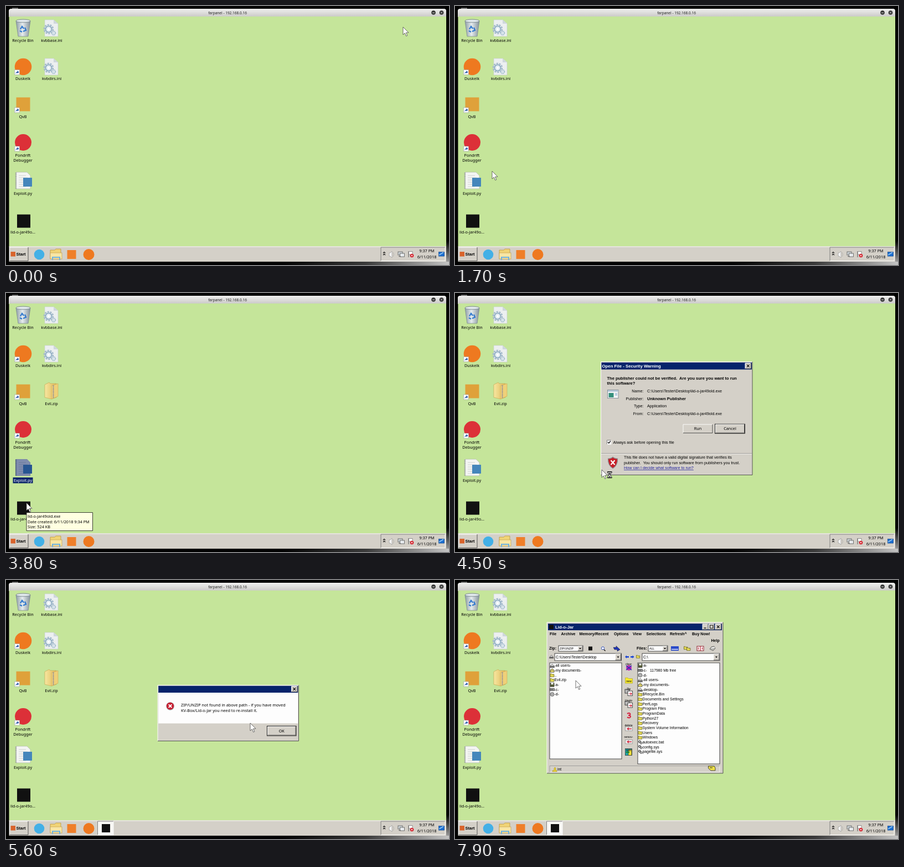
An HTML page that plays this animation: 800 px wide and 469 px high, repeating every 8000 ms.

```html
<!DOCTYPE html>
<html lang="en">
<head>
<meta charset="utf-8">
<title>Remote desktop session</title>
<style>
html, body { margin: 0; width: 100%; height: 100%; overflow: hidden; background: #000; }
svg { display: block; width: 100vw; height: 100vh; }
text { font: 500 7.3px "Noto Sans", sans-serif; white-space: pre; }
.mid { text-anchor: middle; }
.end { text-anchor: end; }
.arial { font: 7.2px "Liberation Sans", sans-serif; }
.list { font: 6.8px "Liberation Sans", sans-serif; }
.tiny { font: 5.2px "Liberation Sans", sans-serif; }
.bold { font: bold 7.5px "Liberation Sans", sans-serif; }
.menu { font: bold 7.1px "Liberation Sans", sans-serif; }
.title { font: bold 7.8px "Liberation Sans", sans-serif; fill: #fff; }
.frame { font-size: 6.5px; }

.timed { animation: 8s step-end infinite; }
#archive { animation-name: archive; }
#scriptSel { animation-name: scriptSel; }
#appSel { animation-name: appSel; }
#tip { animation-name: tip; }
#warning { animation-name: warning; }
#error { animation-name: error; }
#task { animation-name: task; }
#app { animation-name: app; }
#busy { animation-name: busy; }
@keyframes archive { 0% { opacity: 0 } 32.5%, 100% { opacity: 1 } }
@keyframes scriptSel { 0%, 50% { opacity: 0 } 26.25% { opacity: 1 } 100% { opacity: 0 } }
@keyframes appSel { 0%, 55%, 68.75% { opacity: 0 } 50%, 66.25% { opacity: 1 } 100% { opacity: 0 } }
@keyframes tip { 0%, 50% { opacity: 0 } 47.5% { opacity: 1 } 100% { opacity: 0 } }
@keyframes warning { 0%, 66.25% { opacity: 0 } 55% { opacity: 1 } 100% { opacity: 0 } }
@keyframes error { 0%, 76.25% { opacity: 0 } 68.75% { opacity: 1 } 100% { opacity: 0 } }
@keyframes task { 0% { opacity: 0 } 68.75%, 100% { opacity: 1 } }
@keyframes app { 0% { opacity: 0 } 77.5%, 100% { opacity: 1 } }
@keyframes busy { 0%, 58.75% { opacity: 0 } 52.5% { opacity: 1 } 100% { opacity: 0 } }

/* The pointer moves in 100 ms ticks. */
#pointer { animation: point 8s infinite; }
@keyframes point {
  0% { transform: translate(717px, 38px); animation-timing-function: steps(4); }
  5% { transform: translate(402px, 164px); animation-timing-function: steps(1); }
  7.5% { transform: translate(311px, 201px); animation-timing-function: steps(1); }
  10% { transform: translate(311px, 201px); animation-timing-function: steps(9); }
  21.25% { transform: translate(67px, 299px); animation-timing-function: steps(3); }
  25%, 35% { transform: translate(34px, 317px); animation-timing-function: steps(6); }
  42.5%, 51.25% { transform: translate(37px, 380px); animation-timing-function: steps(4); }
  56.25%, 60% { transform: translate(265px, 320px); animation-timing-function: steps(3); }
  63.75%, 67.5% { transform: translate(424px, 245px); animation-timing-function: steps(2); }
  70% { transform: translate(441px, 259px); animation-timing-function: steps(3); }
  73.75%, 81.25% { transform: translate(490px, 275px); animation-timing-function: steps(10); }
  93.75%, 100% { transform: translate(218px, 182px); }
}
</style>
</head>
<body>
<svg viewBox="0 0 800 469" preserveAspectRatio="none">
  <defs>
    <linearGradient id="chrome" x2="0" y2="1">
      <stop stop-color="#f0f0ef"/><stop offset="1" stop-color="#c9c8c6"/>
    </linearGradient>
    <linearGradient id="glow">
      <stop stop-color="#000"/><stop offset=".5" stop-color="#3a3a3a"/><stop offset="1" stop-color="#c4c4c4"/>
    </linearGradient>
    <linearGradient id="glowUp" x2="0" y2="1">
      <stop stop-color="#000"/><stop offset="1" stop-color="#999"/>
    </linearGradient>
    <linearGradient id="manila" x2="1">
      <stop stop-color="#f7e6a0"/><stop offset="1" stop-color="#dfb95a"/>
    </linearGradient>
    <linearGradient id="glass" x2="1">
      <stop stop-color="#8d9ca5"/><stop offset=".45" stop-color="#e6ecee"/><stop offset="1" stop-color="#84929b"/>
    </linearGradient>
    <g id="ini">
      <path d="M1 0H17L25 7V30H1Z" fill="#eceff0" stroke="#c3cbd0" stroke-width=".6"/>
      <path d="M17 0V7H25Z" fill="#cfd7dc"/>
      <circle cx="8" cy="17" r="8" fill="none" stroke="#a3bacb" stroke-width="2.6" stroke-dasharray="3.2 1.8"/>
      <circle cx="8" cy="17" r="5.6" fill="#e3ecf2" stroke="#8aa9c0" stroke-width="1.8"/>
      <circle cx="8" cy="17" r="2" fill="#fff"/>
      <circle cx="17" cy="24" r="3.5" fill="#d8e3ea" stroke="#9db8ca" stroke-width="1.5" stroke-dasharray="1.8 1"/>
    </g>
    <g id="link">
      <path d="M0 0H9V9H0Z" fill="#fff" stroke="#889" stroke-width=".5"/>
      <path d="M2 8C1.7 5 3 3.6 5 3.4V1.6L8 4.2 5 6.8V5.2C3.4 5.2 2.4 6 2 8Z" fill="#2253a8"/>
    </g>
    <g id="folder">
      <path d="M.5 1.5H3L4 2.5H7.3V7H.5Z" fill="#eee35c" stroke="#5f5a1a" stroke-width=".8"/>
      <path d="M1 4H7" stroke="#b5a932" stroke-width=".6"/>
    </g>
    <g id="drive">
      <path d="M0 2H8V6H0Z" fill="#aaa" stroke="#222" stroke-width=".7"/><path d="M1 4H6" stroke="#222" stroke-width=".8"/>
    </g>
    <g id="floppy">
      <path d="M.5 .5H7.5V7.5H.5Z" fill="#555c35" stroke="#222" stroke-width=".6"/><path d="M2 .5H6V3.5H2Z" fill="#fff"/>
    </g>
    <g id="disc">
      <circle cx="4" cy="4" r="3.4" fill="#ccc" stroke="#333" stroke-width=".8"/><circle cx="4" cy="4" r="1.2" fill="#fff" stroke="#333" stroke-width=".6"/>
    </g>
    <g id="home">
      <path d="M1 4L4 1 7 4V5H1Z" fill="#ddd" stroke="#222" stroke-width=".6"/><path d="M0 5.5H8V7.5H0Z" fill="#777" stroke="#222" stroke-width=".5"/>
    </g>
    <g id="docs">
      <path d="M.5 4L4 .8 7.5 4V7.3H.5Z" fill="#f3e675" stroke="#222" stroke-width=".8"/><path d="M2 4H6" stroke="#222" stroke-width=".6"/>
    </g>
    <g id="cog">
      <circle cx="3" cy="3" r="2" fill="#bbb" stroke="#333"/><circle cx="5.6" cy="5.5" r="1.7" fill="#eee" stroke="#333"/>
    </g>
  </defs>

  <path d="M11 3H22V5H11Z" fill="#666"/>
  <path d="M500 463H800V469H500Z" fill="url(#glow)"/>
  <path d="M795 425H800V463H795Z" fill="url(#glowUp)"/>
  <path d="M5 20V9Q5 5 9 5H791Q795 5 795 9V20Z" fill="url(#chrome)"/>
  <text class="mid frame" x="400" y="14.5" fill="#222">farpanel - 192.168.0.16</text>
  <circle cx="772" cy="12" r="3.8" fill="#333"/><path d="M770 12.3H774" stroke="#ddd"/>
  <circle cx="786.5" cy="12" r="3.8" fill="#333"/><path d="M785 10.5L788 13.5M788 10.5L785 13.5" stroke="#ddd" stroke-width=".9"/>
  <path d="M5.5 19H795V435H5.5Z" fill="#c5e59a"/>
  <path d="M5.5 435H795V463H5.5Z" fill="#d4d0c8"/>
  <path d="M5.5 436H795" stroke="#f8f7f4"/>

  <!-- desktop icons -->
  <path d="M18 27L44 27 40 55H22Z" fill="url(#glass)" stroke="#75838c" stroke-width=".7"/>
  <ellipse cx="31" cy="27" rx="13" ry="2.8" fill="#dfe7ea" stroke="#6b7881" stroke-width=".8"/>
  <path d="M26 42L29 37 32 41M34 39L36 44 31 46M29 47L25 45" fill="none" stroke="#2f78cf" stroke-width="2.2"/>
  <circle cx="31" cy="110" r="15.3" fill="#ee7920"/>
  <path d="M18.5 165.5H43.5V190.5H18.5Z" fill="#dfa13a"/>
  <circle cx="31" cy="247" r="15" fill="#dc3038"/>
  <use href="#link" x="15.5" y="115.5"/><use href="#link" x="15.5" y="184"/><use href="#link" x="15.5" y="254"/>
  <path d="M18 301H38L44 307V331H18Z" fill="#f4f5f3" stroke="#b4b9b4" stroke-width=".7"/>
  <path d="M18 302V331" stroke="#8d938f" stroke-width="2.5" stroke-dasharray="1.3 1.5"/>
  <path d="M23 307H36M23 311H39M23 315H33M23 319H31M23 323H32M23 327H36" stroke="#c3c8c5" stroke-width=".8"/>
  <path d="M31 311H47V327H31Z" fill="#4586bb"/>
  <path d="M20 377.5H44V401.5H20Z" fill="#111"/>
  <use href="#ini" x="69" y="25"/><use href="#ini" x="69" y="95"/>
  <g id="labels"></g>
  <g id="archive" class="timed">
    <path d="M70 166L78 162 80 164H91V189L82 192 70 189Z" fill="url(#manila)" stroke="#c49f48" stroke-width=".6"/>
    <path d="M82 168L94 164V187L82 192Z" fill="#efd078" stroke="#c49f48" stroke-width=".5"/>
    <path d="M85.5 167V190" stroke="#85889a" stroke-width="2" stroke-dasharray="1.4 .8"/>
    <text class="mid" x="82" y="203">Evil.zip</text>
  </g>
  <g id="scriptSel" class="timed">
    <path d="M17 301H38L44 307V311H47V327H44V331H17Z" fill="#0a246a" opacity=".5"/>
    <path d="M12.5 334H48.5V344.5H12.5Z" fill="#0a246a"/>
    <text class="mid" x="30.5" y="342" fill="#fff">Exploit.py</text>
  </g>
  <g id="appSel" class="timed">
    <path d="M20 377.5H44V401.5H20Z" fill="#0a246a" opacity=".6"/>
    <path d="M5.5 403.5H55V414.5H5.5Z" fill="#0a246a"/>
    <text class="mid" x="30.5" y="411.5" fill="#fff">lid-o-jar49o...</text>
  </g>

  <g id="bar"></g>
  <g id="task" class="timed"></g>
  <g id="warning" class="timed"></g>
  <g id="error" class="timed"></g>
  <g id="app" class="timed"></g>

  <g id="tip" class="timed">
    <path d="M37 397.5H156.5V430.5H37Z" fill="#ffffe1" stroke="#111" stroke-width=".8"/>
    <text x="39" y="407">lid-o-jar49old.exe</text>
    <text x="39" y="416.5">Date created: 6/11/2018 9:34 PM</text>
    <text x="39" y="426">Size: 524 KB</text>
  </g>
  <g id="pointer">
    <path d="M0 0V14L3.3 11 5.7 16.5 7.8 15.5 5.5 10.2H10Z" fill="#fff" stroke="#333" stroke-width=".7"/>
    <g id="busy" class="timed">
      <path d="M10.5 4H18V5.5L15 9.3 18 13V14.5H10.5V13L13.5 9.3 10.5 5.5Z" fill="#fff" stroke="#111" stroke-width=".9"/>
      <path d="M10 4H18.5M10 14.5H18.5" stroke="#111" stroke-width="1.4"/>
      <path d="M12 6H16.5L14.2 9ZM12 13.5L14.2 11 16.5 13.5Z" fill="#222"/>
    </g>
  </g>
</svg>
<script>
const put = (id, ...parts) => { document.getElementById(id).innerHTML = parts.join(''); };
const text = (x, y, str, cls = '', fill = '#000') => `<text class="${cls}" x="${x}" y="${y}" fill="${fill}">${str}</text>`;
const path = (d, fill = 'none', stroke = 'none', w = 1) => `<path d="${d}" fill="${fill}" stroke="${stroke}" stroke-width="${w}"/>`;
const rect = (x, y, w, h, fill, stroke = 'none', sw = 1) =>
  `<rect x="${x}" y="${y}" width="${w}" height="${h}" fill="${fill}" stroke="${stroke}" stroke-width="${sw}"/>`;
const dot = (x, y, r, fill) => `<circle cx="${x}" cy="${y}" r="${r}" fill="${fill}"/>`;
const icon = (id, x, y, s = 1) => `<use href="#${id}" transform="translate(${x} ${y}) scale(${s})"/>`;
const face = '#d4d0c8', navy = '#06246b';

// Classic raised or sunken panel
function panel(x, y, w, h, fill = face, sunken = false) {
  const [lit, dark] = sunken ? ['#777', '#fff'] : ['#fff', '#484848'];
  return rect(x, y, w, h, fill) +
    path(`M${x} ${y + h}V${y}H${x + w}`, 'none', lit, .9) +
    path(`M${x} ${y + h}H${x + w}V${y}`, 'none', dark, .9);
}
const field = (x, y, w, h) => rect(x, y, w, h, '#fdfdfd', '#333', .9);
const button = (x, y, w, h, label) => panel(x, y, w, h) + text(x + w / 2, y + h / 2 + 2.6, label, 'mid');
const close = (x, y) => panel(x, y, 10.5, 10) +
  path(`M${x + 3} ${y + 2.6}l4.6 4.8m0 -4.8l-4.6 4.8`, 'none', '#000', 1.2);
function combo(x, y, w, h, label, cls) {
  const b = Math.min(h - 2, 10), bx = x + w - b - 1;
  return field(x, y, w, h) + text(x + 2, y + h / 2 + 2.3, label, cls) +
    panel(bx, y + 1, b, h - 2) + path(`M${bx + b / 2 - 2} ${y + h / 2 - 1}h4l-2 2.4Z`, '#000');
}
const rows = (x, y, list) => list.map(([id, label], i) =>
  icon(id, x, y + i * 8.67 - 4) + text(x + 8, y + i * 8.67 + 2.4, label, 'list')).join('');

put('labels', ...[
  [30.5, 64.5, 'Recycle Bin'], [30.5, 134, 'Duskelk'], [30.5, 203, 'QvB'], [30.5, 272.5, 'Pondrift'],
  [30.5, 282.3, 'Debugger'], [30.5, 342, 'Exploit.py'], [30.5, 411.5, 'lid-o-jar49o...'],
  [82.5, 64.5, 'kvbbase.ini'], [82.5, 134, 'kvbdirs.ini']
].map(([x, y, s]) => text(x, y, s, 'mid')));

put('bar',
  panel(6.5, 437, 33.5, 24.5), rect(8.5, 445, 8.5, 8.5, '#d9642c'), text(18.5, 452, 'Start', 'bold'),
  dot(60, 450, 9.3, '#43b0e6'),
  path('M80 442H88L90 440H99V458H80Z', '#f0d477', '#b58e35', .7), rect(80, 447, 21, 11, '#f8e6a4', '#c39f4c', .7),
  path('M84 460V455H97V460', 'none', '#6fb2df', 2),
  rect(110.5, 442, 16, 16, '#ef7f2a'), dot(149.5, 450, 10, '#ee7920'),
  panel(677, 437, 116, 24.5, face, true),
  path('M681 447.5L683 445.5 685 447.5M681 451L683 449 685 451', 'none', '#111', 1.1),
  path('M692 447H694L697 444V456L694 453H692Z', '#f4f4f4', '#999', .7), path('M699 446Q702 450 699 454', 'none', '#aaa', .8),
  rect(708, 445, 8, 6, '#cdd4d8', '#666', .9), rect(711.5, 448, 8, 6, '#e8ecef', '#666', .9),
  path('M709 453.5H713', 'none', '#666'),
  path('M727 444V455', 'none', '#666', 1.1), path('M727.5 444.5H734V450H727.5Z', '#fff', '#777', .8),
  dot(733, 452, 3.3, '#d4232e'), path('M731.7 450.7L734.3 453.3M734.3 450.7L731.7 453.3', 'none', '#fff', .9),
  text(760, 446.3, '9:37 PM', 'mid'), text(760, 457, '6/11/2018', 'mid'),
  rect(781.5, 445.5, 10, 7.5, '#1d6fd1', '#164b91', .8), path('M782 451L790 446', 'none', '#8dc4f3', 1.5));

put('task', panel(165.5, 437, 28.5, 24.5, '#f8f7f4', true), rect(173, 442, 15, 15, '#111'));

const exe = 'C:\\Users\\Tester\\Desktop\\lid-o-jar49old.exe';
put('warning',
  panel(263.5, 124.5, 273.5, 205), rect(264.5, 125.8, 271.5, 12.7, navy),
  text(265.5, 134.8, 'Open File - Security Warning', 'title'), close(524, 127),
  text(274.5, 157, 'The publisher could not be verified.  Are you sure you want to run', 'bold'),
  text(274.5, 166, 'this software?', 'bold'),
  rect(275.5, 175.5, 19.5, 15, '#f4f4f4', '#87929b'), rect(276, 176, 18.5, 3, '#b9ccdc'),
  rect(277.5, 181, 9, 8, '#35907b'), rect(289, 181, 4, 5, '#b9cee1'),
  ...[['Name:', exe, 'arial'], ['Publisher:', 'Unknown Publisher', 'bold'], ['Type:', 'Application', 'arial'], ['From:', exe, 'arial']]
    .map(([k, v, c], i) => text(340.5, 179.8 + i * 13.7, k, 'arial end') + text(347, 179.8 + i * 13.7, v, c)),
  button(412, 238, 53, 15.5, 'Run'),
  rect(469.5, 237.3, 54, 17, 'none', '#111', .9), button(470.5, 238.2, 52, 15, 'Cancel'),
  panel(274.5, 266.5, 7.5, 7.5, '#fff', true), path('M276 270L277.8 272 281 268', 'none', '#111', 1.3),
  text(285.5, 273.3, 'Always ask before opening this file', 'arial'),
  path('M264 290.5H536', 'none', '#85817b', .8), path('M264 291.4H536', 'none', '#fff', .8),
  path('M276.5 300Q282 300 285 297Q288 300 293.5 300Q294 312 285 317.5Q276 312 276.5 300Z', '#c81d26', '#8b8b90', 1.2),
  path('M281.5 303L288.5 311M288.5 303L281.5 311', 'none', '#fff', 2.2),
  text(305, 300.3, 'This file does not have a valid digital signature that verifies its', 'arial'),
  text(305, 309.8, 'publisher.  You should only run software from publishers you trust.', 'arial'),
  text(305, 319, '<tspan text-decoration="underline">How can I decide what software to run?</tspan>', 'arial', '#20209c'));

put('error',
  panel(274, 190.5, 254.5, 101), rect(275.2, 191.7, 252, 12.3, navy), close(515.5, 192.5),
  rect(275.2, 204, 252, 55.7, '#fdfdfd'),
  dot(296.5, 228.5, 7.3, '#9a969a'), dot(296.5, 228.2, 6.5, '#c91f32'),
  path('M293.7 225.4L299.3 231M299.3 225.4L293.7 231', 'none', '#fff', 2),
  text(316, 229.3, 'ZIP/UNZIP not found in above path - if you have moved'),
  text(316, 238.8, 'KV-Box/Lid-o-Jar you need to re-install it.'),
  rect(471.5, 264.5, 52.5, 17.5, 'none', '#111', .9), button(472.5, 265.5, 50.5, 15.5, 'OK'));

const menus = [[171, 'File'], [191.5, 'Archive'], [224.5, 'Memory/Recent'], [287, 'Options'],
  [321, 'View'], [345.5, 'Selections'], [388, 'Refresh^'], [428, 'Buy Now!']];
const tools = [['clear', 153], ['Zip', 198], ['Unzip', 219], ['delete', 264], ['remov-', 285]];
const sheet = y => rect(307, y - 3, 8, 7, '#bbb', '#222', .8) +
  rect(312, y, 8.5, 8.5, '#fff', '#222', .8) + path(`M314 ${y + 5}h5m-2 -2l2 2-2 2`, 'none', '#d3263c', 1.2);
const letter = y => rect(307.5, y, 13, 7, '#eee', '#777', .6) +
  path(`M319 ${y + 3.5}h-8m3 -2l-3 2 3 2`, 'none', '#d3263c', 1.3);

put('app',
  panel(166, 76.5, 318, 273.5), rect(168, 79, 314, 12, navy),
  rect(170, 81, 8, 8, '#111'), text(181, 87.5, 'Lid-o-Jar', 'title'),
  panel(447, 79.8, 10, 10), path('M449.5 87H453.5', 'none', '#000', 1.3),
  panel(458, 79.8, 10, 10), rect(460.5, 82, 5.3, 5.3, 'none', '#000', .9), close(470, 79.8),
  ...menus.map(([x, s]) => text(x, 99.5, s, 'menu')), text(462.5, 111.5, 'Help', 'menu'),
  text(170, 126, 'Zip:', 'menu'), combo(187, 119, 44, 10, 'ZIP/UNZIP', 'tiny'),
  rect(241, 120.5, 7, 7, '#111'),
  `<circle cx="267" cy="123.5" r="2.6" fill="#fff" stroke="#2445b4"/>`, path('M269 126L271.5 128.5', 'none', '#111', 1.4),
  path('M286 122H291V119.5L298 126 293 129V126H288Z', '#2036b8', '#111', .5),
  text(328, 126, 'Files:', 'menu'), combo(349, 119, 35, 10, 'ALL', 'tiny'),
  rect(390, 120, 14, 8, '#2949c9'), path('M391 125.5H403', 'none', '#fff', 1.3),
  icon('folder', 413, 119, .95), icon('folder', 418, 121, .95),
  rect(437, 120, 12, 8, '#fff', '#8a1c28', 1), path('M443 120V128M439.5 122V126M446.5 122V126', 'none', '#b92435', 1.2),
  path('M460 125L463 121 468 120 470 124 466 128Z', '#b5b5b0', '#444', .7), path('M463 123L469 122', 'none', '#fff', 1.3),
  icon('home', 170.5, 135, .9), combo(180, 133, 120.5, 13, 'C:\\Users\\Tester\\Desktop', 'list'),
  path('M307 139L310 136.5V138H314V140.5H310V142Z', '#1943d4'), path('M323.5 139L320.5 136.5V138H317V140.5H320.5V142Z', '#1943d4'),
  icon('folder', 327, 135, .9), combo(338, 133, 140, 13, 'C:\\', 'list'),
  field(171, 150, 130, 174), field(330, 150, 148, 183),
  rows(171.5, 155, [['home', '-all users-'], ['docs', '-my documents-'], ['folder', '..'], ['folder', 'Evil.zip'],
    ['floppy', '-a-'], ['drive', '-c-'], ['disc', '-d-']]),
  rows(330.5, 155, [['floppy', '-a-'], ['drive', '-c-   117980 Mb free'], ['disc', '-d-'], ['home', '-all users-'],
    ['docs', '-my documents-'], ['home', '-desktop-'],
    ...['$Recycle.Bin', 'Documents and Settings', 'PerfLogs', 'Program Files', 'ProgramData', 'Python27', 'Recovery',
      'System Volume Information', 'Users', 'Windows'].map(s => ['folder', s]),
    ...['autoexec.bat', 'config.sys', 'pagefile.sys'].map(s => ['cog', s])]),
  dot(314, 159, 5, '#c22cae'), path('M309 155L319 163M319 155L309 163', 'none', '#2730b7', 1.6),
  path('M307.5 177H312L313.5 178.5H320.5V187H307.5Z', '#f7ea2e', '#a59a20', .6), text(314, 184.8, 'new', 'tiny mid'),
  sheet(201), sheet(222.5),
  path('M311 242Q316 239.5 316.5 243Q316 245 313 245Q317 245 317 247.5Q316 251 311 248.5', 'none', '#d5203f', 2),
  letter(266), letter(289.5),
  ...tools.map(([s, y]) => text(313.5, y + 1, s, 'tiny mid')),
  rect(307.5, 305.5, 12, 12, '#21a8ad', '#222', .7), rect(313, 307, 6, 10.5, '#f2df3c', '#222', .6),
  path('M309 312H315', 'none', '#1d8535', 2.5), text(313.5, 309.8, 'Exit', 'tiny mid'),
  path('M171 348V336.5H478', 'none', '#888', .7), path('M171 348H478V336.5', 'none', '#fff', .7),
  path('M176 347V345H179V341L180.5 339 182 341V345H184V347Z', '#f0d42c', '#8e7d15', .5), text(185, 345.3, 'int', 'list'),
  path('M457.5 337H468L470 340V345H462L457.5 341Z', '#f0e24a', '#222', .8), path('M460 340H465', 'none', '#222', 1));
</script>
</body>
</html>
```
